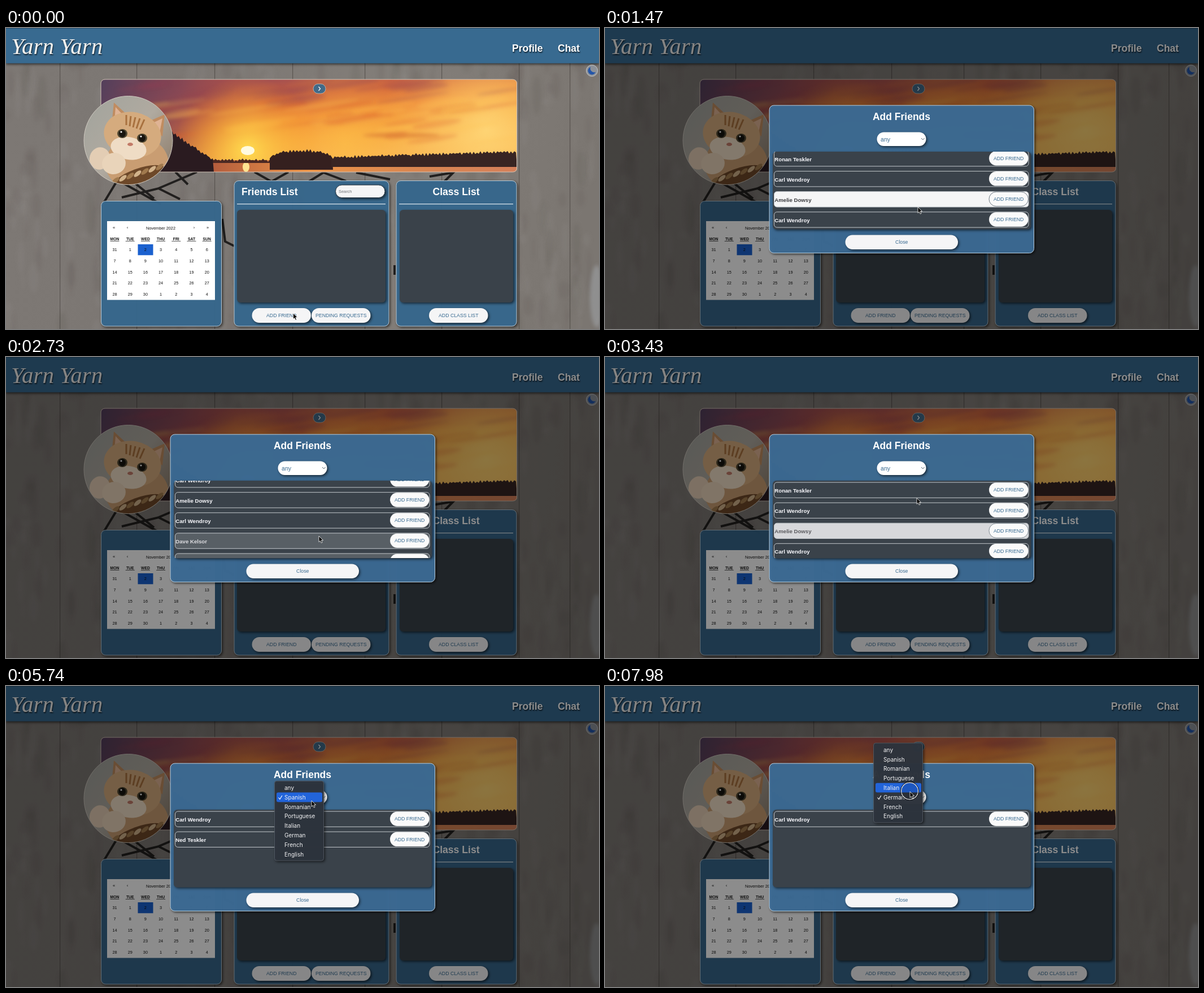
An HTML page with a canvas that plays this animation: 1050x533 px, repeating every 8000 ms.

```html
<!DOCTYPE html>
<html lang="en">
<head>
<meta charset="utf-8">
<title>Friends page</title>
<style>
  html, body { margin: 0; width: 100%; height: 100%; overflow: hidden; background: #7b7671; }
  canvas, svg { position: absolute; left: 0; top: 0; width: 100%; height: 100%; will-change: transform; }
  text { font-family: "Liberation Sans", Arial, sans-serif; white-space: pre; }
  .b { font-weight: 700; }
  .m { text-anchor: middle; }
  .menu text { font-family: Inter, "Liberation Sans", sans-serif; }
  .logo { font: italic 41px "Liberation Serif", serif; }
  .ts { text-shadow: 1px 2px 2px rgba(0,0,0,.65); }
  .sh { filter: drop-shadow(2px 2px 2px rgba(0,0,0,.6)); }
</style>
</head>
<body>
<canvas id="photo" width="1050" height="533"></canvas>
<svg id="page" viewBox="0 0 1050 533"></svg>
<svg id="pop" viewBox="0 0 1050 533">
  <clipPath id="view"><rect x="297" y="219" width="457" height="137"/></clipPath>
  <rect id="dim" width="1050" height="533" fill="#000"/>
  <g id="modal">
    <g id="frame"></g>
    <g id="select"></g>
    <g id="rows" clip-path="url(#view)"></g>
  </g>
  <g id="menu" class="menu"></g>
  <g id="cursor">
    <circle id="ring" cx="-.5" cy="-1" r="15" fill="rgba(0,0,0,.12)" stroke="#e4e4e4" stroke-width="1.4"/>
    <circle id="ring2" cx="-.5" cy="-1" r="16.2" fill="none" stroke="#15181c" stroke-width="1"/>
    <path d="M0 0V10.6L2.4 8.4L4.1 12.2L6 11.4L4.3 7.6H7.6Z" fill="#000" stroke="#fff" stroke-width=".8"/>
  </g>
</svg>
<script>
const $ = id => document.getElementById(id);
const BLUE = '#386a90', PALE = '#f5f5f6', DARK = '#3a424a';

// ---------- markup helpers ----------
const rect = (x, y, w, h, r, fill, more = '') =>
  `<rect x="${x}" y="${y}" width="${w}" height="${h}" rx="${r}" fill="${fill}" ${more}/>`;
const text = (x, y, size, str, fill, cls = '') =>
  `<text x="${x}" y="${y}" font-size="${size}" fill="${fill}" class="${cls}">${str}</text>`;
const pill = (x, y, w, h, label) =>
  rect(x, y, w, h, h / 2, PALE, 'class="sh"') + text(x + w / 2, y + h / 2 + 3, 8.75, label, BLUE, 'm');
const card = (x, y, w, h) =>
  rect(x, y, w, h, 8, BLUE, 'fill-opacity=".95" stroke="#b9cbd8" stroke-width="1" class="sh"');
const panel = (x, y, w, h) => rect(x, y, w, h, 6, DARK, 'class="sh"');
const line = (x1, x2, y) => rect(x1, y, x2 - x1, 1.3, 0, '#d6e1e9');

// ---------- photographs and wall ----------
const c = $('photo').getContext('2d');
let seed = 7;
const rnd = () => (seed = (seed * 16807) % 2147483647) / 2147483647;

function ellipse(x, y, rx, ry, fill, turn = 0) {
  c.fillStyle = fill;
  c.beginPath();
  c.ellipse(x, y, rx, ry, turn, 0, 7);
  c.fill();
}
function poly(fill, ...p) {
  c.fillStyle = fill;
  c.beginPath();
  for (let i = 0; i < p.length; i += 2) c.lineTo(p[i], p[i + 1]);
  c.fill();
}
function glow(x, y, r, inner, outer) {
  const g = c.createRadialGradient(x, y, 0, x, y, r);
  g.addColorStop(0, inner);
  g.addColorStop(1, outer);
  c.fillStyle = g;
  c.fillRect(x - r, y - r, 2 * r, 2 * r);
}
function fade(x1, y1, x2, y2, ...cols) {
  const g = c.createLinearGradient(x1, y1, x2, y2);
  cols.forEach((k, i) => g.addColorStop(i / (cols.length - 1), k));
  return g;
}

function wall() {
  c.fillStyle = fade(0, 0, 1050, 200, '#7d7874', '#7c7773', '#837e79', '#7b7671');
  c.fillRect(0, 0, 1050, 533);
  c.filter = 'blur(3px)';
  for (let i = 0; i < 500; i++)
    ellipse(rnd() * 1050, rnd() * 533, 2 + rnd() * 8, 6 + rnd() * 34,
      rnd() < .5 ? 'rgba(50,44,40,.07)' : 'rgba(190,186,180,.06)');
  ellipse(1046, 475, 12, 55, 'rgba(175,182,190,.4)');
  c.filter = 'none';
  for (const x of [95, 231, 369, 507, 635, 771, 908, 998]) {
    c.fillStyle = 'rgba(60,55,51,.55)';
    c.fillRect(x, 62, 1.2, 471);
  }
  c.strokeStyle = '#211f1e';
  c.lineWidth = 4;
  c.beginPath();
  const strokes = [
    [197, 270, 174, 308], [206, 274, 274, 312], [225, 272, 262, 302], [205, 300, 270, 284, 308, 303],
    [270, 284, 338, 255], [300, 255, 322, 277], [383, 338, 388, 378, 404, 386], [440, 255, 470, 272, 500, 255],
    [536, 272, 562, 256, 602, 271], [620, 256, 680, 268], [750, 263, 792, 256, 776, 272], [688, 420, 688, 437]
  ];
  for (const s of strokes)
    for (let i = 0; i < s.length; i += 2) c[i ? 'lineTo' : 'moveTo'](s[i], s[i + 1]);
  c.stroke();
}

function trees(x1, x2, top, bottom, fill) {
  c.fillStyle = fill;
  c.beginPath();
  c.moveTo(x1, bottom);
  for (let x = x1, i = 0; x <= x2; x += 3) c.lineTo(x, top((x - x1) / (x2 - x1)) + (i++ % 2 ? 3 : -3) * rnd());
  c.lineTo(x2, bottom);
  c.fill();
}

function sunset() {
  c.save();
  c.beginPath();
  c.roundRect(168, 91, 737, 164, 7);
  c.clip();
  c.fillStyle = fade(480, 91, 500, 240, '#a4504f', '#cf623f', '#ec8437', '#f5a443', '#f8b455');
  c.fillRect(168, 91, 737, 164);
  c.fillStyle = fade(168, 91, 430, 190, 'rgba(78,62,92,.95)', 'rgba(125,68,86,.7)', 'rgba(190,80,60,0)');
  c.fillRect(168, 91, 737, 164);
  glow(850, 180, 190, 'rgba(255,216,120,.9)', 'rgba(255,200,90,0)');
  glow(600, 205, 150, 'rgba(253,190,70,.7)', 'rgba(253,180,60,0)');
  c.filter = 'blur(3px)';
  for (let i = 0; i < 60; i++) {
    const y = 95 + rnd() * 105;
    const tone = y < 130 ? 'rgba(140,66,84,.25)' : rnd() < .5 ? 'rgba(214,88,48,.22)' : 'rgba(255,196,84,.25)';
    ellipse(230 + rnd() * 670, y, 20 + rnd() * 50, 2 + rnd() * 5, tone, -.15);
  }
  ellipse(700, 190, 68, 4, 'rgba(214,116,50,.6)');
  c.filter = 'none';
  glow(428, 216, 130, 'rgba(255,222,80,.95)', 'rgba(250,160,40,0)');
  ellipse(428, 217, 12, 8, '#fffbe0');
  c.fillStyle = fade(168, 0, 904, 0, '#5c3340', '#b0583c', '#ec9548', '#d98650', '#d5805a');
  c.fillRect(168, 234, 737, 21);
  ellipse(425, 246, 6, 9, '#ffe391');
  trees(365, 475, () => 234, 239, '#4c2923');
  trees(168, 368, u => 184 + 50 * Math.max(0, (u - .62) / .38), 255, '#2a1b20');
  trees(467, 579, u => 233 - 16 * Math.sin(Math.PI * u) ** .4, 251, '#35201f');
  trees(576, 905, u => 229 - 10 * u, 246, '#382523');
  c.restore();
  c.strokeStyle = '#d3c4b8';
  c.lineWidth = 1;
  c.beginPath();
  c.roundRect(168, 91, 736.5, 164, 7);
  c.stroke();
}

function cat() {
  c.save();
  c.beginPath();
  c.arc(216.5, 199, 78.5, 0, 7);
  c.clip();
  c.fillStyle = fade(145, 135, 290, 260, '#a3a49d', '#b0aaa0', '#8d7c6a');
  c.fillRect(130, 115, 170, 170);
  ellipse(232, 240, 56, 48, '#c99d72');
  poly('#c08c60', 187, 172, 191, 132, 217, 156);
  poly('#dfb394', 192, 165, 194, 140, 210, 157);
  poly('#c08c60', 247, 168, 281, 153, 277, 192);
  poly('#dfb394', 256, 170, 277, 160, 272, 185);
  ellipse(224, 189, 51, 40, '#d5ab7e', .2);
  ellipse(217, 213, 32, 20, '#efdcc5', .2);
  c.strokeStyle = '#a8713f';
  c.lineWidth = 3;
  c.beginPath();
  for (let i = 0; i < 5; i++) {
    c.moveTo(213 + i * 8, 154 + i * 2);
    c.lineTo(213 + i * 6, 172 + i * 2);
  }
  c.stroke();
  for (const [x, y] of [[206, 187], [241, 195]]) {
    ellipse(x, y, 9, 8, '#4f4630');
    ellipse(x, y, 6, 6.5, '#17140f');
    ellipse(x - 2, y - 3, 1.6, 1.6, '#fff');
  }
  ellipse(220, 206, 5, 3, '#c27a68');
  ellipse(166, 231, 18, 20, '#e3cdb4', .3);
  ellipse(191, 240, 21, 19, '#e9d4ba', -.2);
  ellipse(235, 268, 52, 19, '#6d4829', -.35);
  for (let i = 0; i < 7; i++) ellipse(194 + i * 13, 270 - i * 4, 8, 3.5, i % 2 ? '#d2b38b' : '#a17a4e', -.7);
  c.restore();
  c.strokeStyle = '#cfc9c0';
  c.lineWidth = 1;
  c.beginPath();
  c.arc(216.5, 199, 78.5, 0, 7);
  c.stroke();
}

wall();
sunset();
cat();

// ---------- page ----------
function calendar() {
  let s = card(168.5, 306.5, 213, 221.5) + rect(179, 342, 191, 139.5, 0, '#fff') +
    rect(233.5, 383, 27, 19.3, 0, '#1b61cf') + text(274, 356.5, 7.3, 'November 2022', '#111', 'm');
  [['«', 191], ['‹', 215], ['›', 333], ['»', 357]].forEach(([k, x]) => s += text(x, 356, 7.5, k, '#111', 'm'));
  'MON TUE WED THU FRI SAT SUN'.split(' ').forEach((d, i) => {
    const x = 192.5 + 27.2 * i;
    s += text(x, 376.3, 6.8, d, '#111', 'm b') + rect(x - 8, 377.3, 16, .7, 0, '#111');
  });
  for (let i = 0; i < 35; i++) {
    const day = i ? (i - 1) % 30 + 1 : 31;
    s += text(192.5 + 27.2 * (i % 7), 395.1 + 19.75 * Math.floor(i / 7), 7.3, day, '#111', 'm');
  }
  return s;
}

$('page').innerHTML =
  rect(0, 0, 1050, 62.5, 0, BLUE, 'style="filter:drop-shadow(0 2px 2px rgba(0,0,0,.6))"') +
  rect(0, 0, 1050, 1, 0, '#2b4f6b') +
  '<text x="9" y="46" fill="#f3f1ee" class="logo ts">Yarn Yarn</text>' +
  text(896, 42, 17.5, 'Profile', '#fff', 'b ts') + text(977, 42, 17.5, 'Chat', '#fff', 'b ts') +
  '<circle cx="1037.5" cy="75.5" r="10" fill="#8d9299" stroke="#c6c8ca"/>' +
  '<path d="M1035 69A7 7 0 1 0 1044 78A7 7 0 0 1 1035 69Z" fill="#2355a8"/>' +
  rect(544, 99, 22, 17, 8.5, '#426a88', 'stroke="#c9c3b8" stroke-width=".8"') +
  '<path d="M553.5 104l3 3.5l-3 3.5" fill="none" stroke="#fff" stroke-width="1.2"/>' +
  calendar() +
  card(404, 270.5, 274, 257.5) + text(417, 295.5, 17.6, 'Friends List', '#fff', 'b') +
  rect(583.5, 278, 87.5, 22.5, 11.2, PALE, 'stroke="#25333f" stroke-width="1" class="sh"') +
  text(589, 291.8, 7.4, 'Search', '#6c6f74') + line(409, 672, 311) + panel(409, 322, 263, 164) +
  pill(435.5, 496, 104.5, 26, 'ADD FRIEND') + pill(541, 496, 104.5, 26, 'PENDING REQUESTS') +
  card(691, 270.5, 213, 257.5) + text(797, 295.5, 17.6, 'Class List', '#fff', 'b m') +
  line(696, 898, 311) + panel(697, 322, 201, 164) + pill(749, 496, 104.5, 26, 'ADD CLASS LIST');

$('frame').innerHTML =
  rect(291, 137, 468.5, 261.5, 8, '#3d6c95', 'fill-opacity=".96" stroke="#b9d0e0" class="sh"') +
  text(525, 162.5, 17.5, 'Add Friends', '#fff', 'b m') + panel(297, 219, 457, 137.5) +
  pill(425.5, 366.5, 199.5, 25.5, 'Close');

// ---------- timeline ----------
const LANGS = ['any', 'Spanish', 'Romanian', 'Portuguese', 'Italian', 'German', 'French', 'English'];
const PEOPLE = {
  any: ['Ronan Teskler', 'Carl Wendroy', 'Amelie Dowsy', 'Carl Wendroy', 'Dave Kelsor', 'Ned Teskler'],
  Spanish: ['Carl Wendroy', 'Ned Teskler'],
  German: ['Carl Wendroy']
};
const MOVES = [[0, 508.5, 505], [490, 508.5, 505], [800, 535, 395], [1190, 554, 317], [3290, 554, 317], [3360, 553.5, 300],
  [3430, 552, 249.8], [3640, 547, 207], [3920, 545, 192], [4340, 545, 192], [4830, 542, 212], [5110, 542, 212],
  [5390, 541, 203], [5810, 541, 203], [6370, 537, 263], [7350, 537, 263], [7840, 540, 187], [8000, 540, 187]];
const SCROLL = [[0, 0], [1400, 0], [1470, 4.5], [1610, 38], [1750, 68], [1960, 86], [2520, 86], [2590, 84],
  [2660, 78], [2730, 54.5], [2870, 24], [3010, 8], [3220, 0], [8000, 0]];
const RINGS = [[70, 210], [4200, 340 + 4000], [4970, 5110], [5600, 5740], [6580, 6720], [7910, 8000]];
const MENUS = [ // open, highlight blink, fade start, fade end, ticked item
  { open: 4270, blink: 5040, close: 5110, end: 5320, pick: 0 },
  { open: 5670, blink: 6720, close: 6790, end: 7070, pick: 1 },
  { open: 7980, blink: 9e3, close: 9e3, end: 9e3, pick: 5 }
];

const clamp = v => Math.max(0, Math.min(1, v));
function track(keys, t, n = 1) {
  const i = Math.max(1, keys.findIndex(k => k[0] >= t));
  const [a, b] = [keys[i - 1], keys[i]];
  return a[n] + (b[n] - a[n]) * clamp((t - a[0]) / (b[0] - a[0]));
}
const rowTop = (i, t) => 222 + 36.1 * i - track(SCROLL, t);
const menuAt = t => MENUS.find(m => t >= m.open && t < m.end);
const langAt = t => t < 5180 ? 'any' : t < 6860 ? 'Spanish' : 'German';

function hovered(i, t) {
  if (t < 420 || menuAt(t)) return 0;
  const y = track(MOVES, t, 2) - rowTop(i, t);
  return y >= 0 && y <= 27.5 ? 1 : 0;
}
// Hover colour eases over four steps.
function hoverLevel(i, t) {
  let n = 0;
  for (let k = 0; k < 4; k++) n += hovered(i, t - 70 * k) / 4;
  return n * n * (3 - 2 * n);
}

function row(name, i, t) {
  const y = rowTop(i, t), h = hoverLevel(i, t), g = 250 - 190 * h;
  return rect(299.5, y, 450.5, 27.3, 5, PALE, `fill-opacity="${h}" stroke="#c3c8cc" stroke-width="1"`) +
    text(300.3, y + 18, 9.65, name, `rgb(${g},${g},${g + 4})`, 'b') +
    rect(680, y + .5, 69.5, 25.5, 12.7, '#fafafa', `stroke="#4d5b67" stroke-width=".8" stroke-opacity="${h}"`) +
    text(714.7, y + 16.4, 8.75, 'ADD FRIEND', BLUE, 'm');
}

function menu(m, t) {
  const top = 197 - 16.8 * m.pick;
  const over = t === m.blink ? -1 : Math.floor((track(MOVES, Math.min(t, m.close), 2) - top + 8.4) / 16.8);
  let s = rect(475.5, top - 12, 87, 141, 4, '#2e343d', 'fill-opacity=".97" stroke="#596069" stroke-width=".8" class="sh"');
  LANGS.forEach((name, i) => {
    const y = top + 16.8 * i;
    if (i === over) s += rect(479, y - 8.4, 81, 16.8, 3, '#2264da');
    if (i === m.pick) s += `<path d="M482.5 ${y + .5}l2.4 3l4-6.5" fill="none" stroke="#fff" stroke-width="1.2"/>`;
    s += text(493, y + 3.7, 10, name, '#f3f3f4');
  });
  return s;
}

let last = -1;
function draw(now) {
  requestAnimationFrame(draw);
  const t = Math.floor(now % 8000 / 70) * 70;
  if (t === last) return;
  last = t;
  const shown = clamp((t - 70) / 350), lang = langAt(t), m = menuAt(t);
  $('dim').setAttribute('opacity', .45 * shown);
  $('modal').setAttribute('opacity', shown);
  $('select').innerHTML = rect(481.5, 184.5, 87, 24.5, 12.2, '#fff', 'class="sh"') +
    text(488, 200.8, 10.6, lang, BLUE) +
    '<path d="M560 195l2.8 3l2.8-3" fill="none" stroke="#5c6873" stroke-width="1"/>';
  $('rows').innerHTML = PEOPLE[lang].map((p, i) => row(p, i, t)).join('');
  $('menu').innerHTML = m ? menu(m, t) : '';
  $('menu').setAttribute('opacity', m ? clamp((m.end - t) / (m.end - m.close)) || 1 : 0);
  $('cursor').setAttribute('transform', `translate(${track(MOVES, t, 1)} ${track(MOVES, t, 2)})`);
  const ring = RINGS.some(([a, b]) => t >= a && t < b) ? 1 : 0;
  $('ring').setAttribute('opacity', ring);
  $('ring2').setAttribute('opacity', ring);
}
requestAnimationFrame(draw);
</script>
</body>
</html>
```
